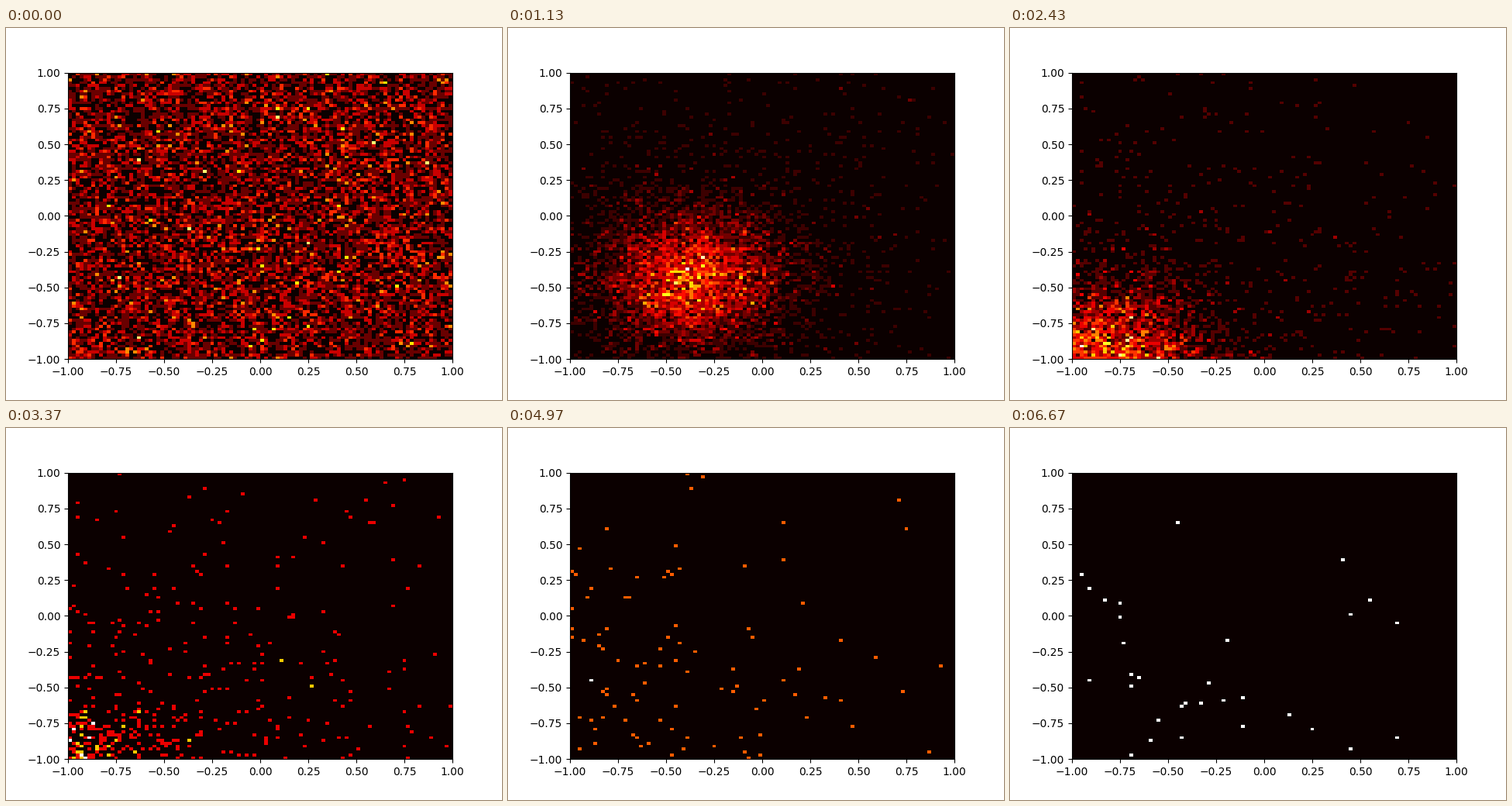
Write a matplotlib script that moves like this. It is 640 by 480 pixels and loops after 6710 ms.

```python
import numpy as np
import matplotlib.pyplot as plt
from matplotlib.animation import FuncAnimation

FRAMES, LOOP = 201, 6710
COUNT, BINS = 10000, 100
EDGES = np.linspace(-1, 1, BINS + 1)
DRIFT = np.array([-0.0124, -0.0149])
DECAY = 0.1
GROUPS = [4800, 1100, 1300, 2800]  # core, shell, halo, escaping

rng = np.random.default_rng(8)
start = rng.uniform(-1, 1, (COUNT, 2))


def spread(t):
    age = max(t - 34, 0)
    sizes = [0.25 + 0.001 * age, 0.45 + 0.0045 * age,
             1.2 + 0.002 * age, 0.25 * t]
    return np.repeat(sizes, GROUPS)[:, None]


def swarm(t, walk):
    """Uniform cloud that contracts onto a drifting centre."""
    fade = np.exp(-DECAY * t)
    centre = DRIFT * (t - 4 * (1 - np.exp(-t / 8)))
    return centre + start * fade + np.sqrt(1 - fade**2) * spread(t) * walk


def simulate():
    keep = np.exp(-DECAY)
    walk = rng.normal(size=(COUNT, 2))
    grids = []
    for t in range(FRAMES):
        x, y = swarm(t, walk).T
        grids.append(np.histogram2d(y, x, bins=[EDGES, EDGES])[0])
        walk = keep * walk + np.sqrt(1 - keep**2) * rng.normal(size=walk.shape)
    return grids


def peak(t):
    return round(np.interp(t, [0, 34, 47, 73, 101, 120, 149, 165],
                           [7, 13, 11, 9, 3, 2, 2, 1]))


grids = simulate()
fig, ax = plt.subplots(figsize=(6.4, 4.8), dpi=100)
mesh = ax.pcolormesh(EDGES, EDGES, grids[0], cmap="hot", vmin=0, vmax=peak(0))
ax.set(xlim=(-1, 1), ylim=(-1, 1))


def update(t):
    mesh.set_array(grids[t])
    mesh.set_clim(0, peak(t))
    return (mesh,)


anim = FuncAnimation(fig, update, frames=FRAMES, interval=LOOP / FRAMES,
                     repeat=True, repeat_delay=0, blit=False)
plt.show()
```
